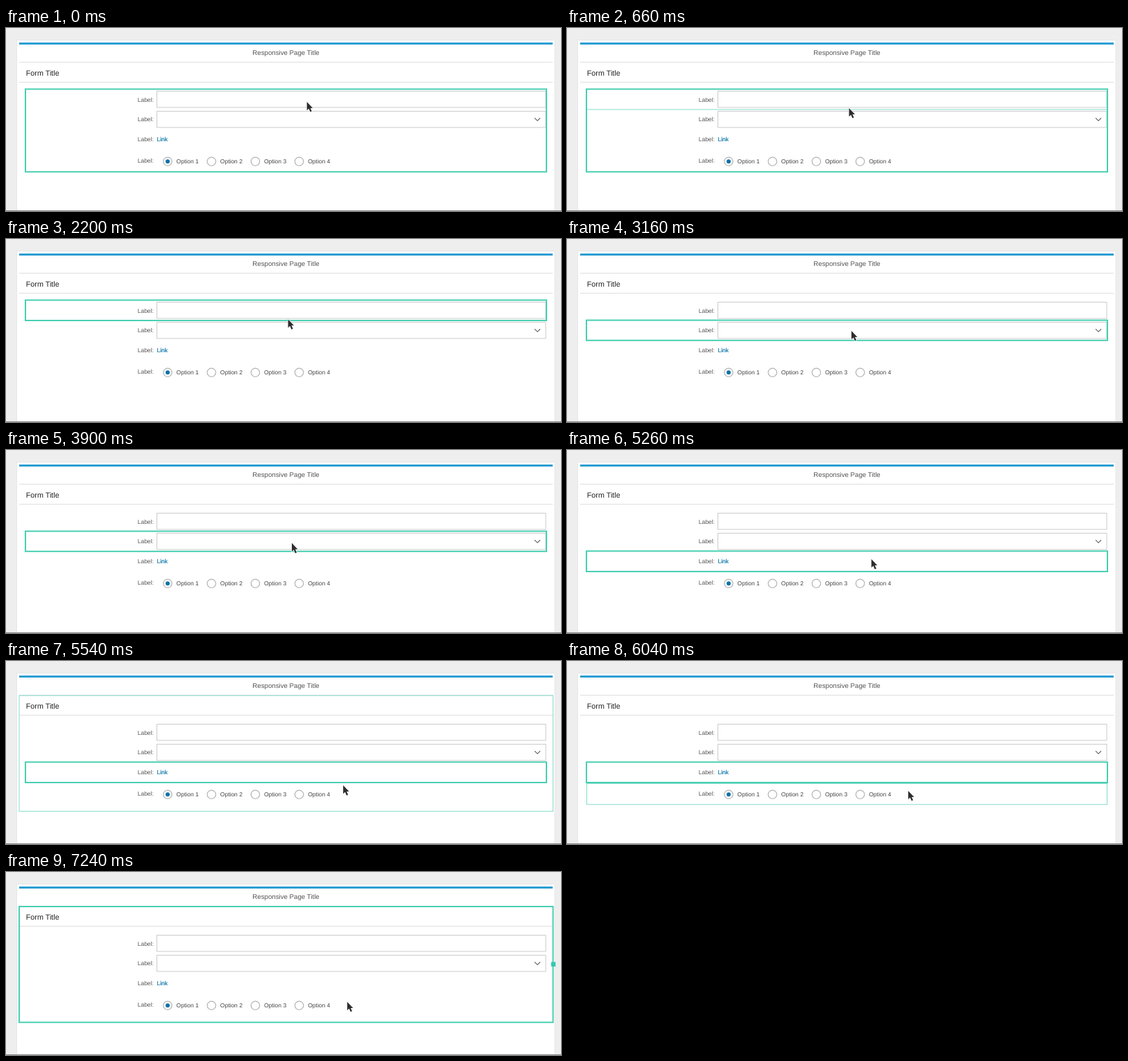
An HTML page that plays this animation: 800x265 px, repeating every 7.5 s.

```html
<!DOCTYPE html>
<html lang="en">
<head>
<meta charset="utf-8">
<title>Form selection</title>
<style>
  html, body { margin: 0; width: 100%; height: 100%; overflow: hidden; background: #eee; }
  svg { display: block; width: 800px; height: 265px; }
  text { font: 8.5px "Liberation Sans", Arial, sans-serif; fill: #555; text-rendering: geometricPrecision; }
  .title { font-size: 9.7px; text-anchor: middle; }
  .heading { font-size: 10.8px; fill: #222; }
  .link { fill: #0d76a8; stroke: #0d76a8; stroke-width: .2px; }
  .option { fill: #444; }
  .rule { fill: #dedede; }
  .field { fill: #fff; stroke: #cbcbcb; }
  .radio { fill: #fff; stroke: #b4b4b4; stroke-width: 1.2px; }
  #hover { fill: none; stroke: #82dcc9; stroke-width: 1px; }
  #selection { fill: none; stroke: #47cfb2; stroke-width: 2px; }
</style>
</head>
<body>
<svg viewBox="0 0 800 265">
  <rect width="800" height="265" fill="#eee"/>
  <rect x="15.5" y="17.5" width="775.5" height="250" fill="#fff" stroke="#e7e7e7"/>
  <rect x="19" y="21" width="769" height="3" fill="#2b9ed3"/>
  <rect class="rule" x="19" y="49" width="769" height="1"/>
  <rect class="rule" x="19" y="78" width="769" height="1"/>
  <text class="title" x="403.5" y="38.7">Responsive Page Title</text>
  <text class="heading" x="28.7" y="68.6">Form Title</text>
  <rect class="field" x="217.5" y="91.5" width="560.5" height="23.5"/>
  <rect class="field" x="217.5" y="120.5" width="560.5" height="23.5"/>
  <path d="M762 130.3l4 4 4-4" fill="none" stroke="#555" stroke-width="1.1"/>
  <text class="link" x="217.5" y="164">Link</text>
  <g id="controls"></g>
  <rect y="264" width="800" height="1" fill="#8c8c8c"/>
  <rect id="hover"/>
  <rect id="selection"/>
  <rect id="handle" x="785.8" y="130.3" width="6.4" height="6.6" fill="#36c9b0"/>
  <path id="cursor" d="M0 0V12.2L2.8 9.7 4.9 14.6 7.1 13.6 5 8.9H8.5Z"
        fill="#2e2e2e" stroke="#fff" stroke-width="1.4" paint-order="stroke" stroke-linejoin="round"/>
</svg>
<script>
const LOOP = 7500;
const byId = id => document.getElementById(id);

// Outlines as [left, top, right, bottom]
const row = (top, bottom) => [28, top, 779, bottom];
const group = row(88.5, 208.3);
const rows = [row(88.5, 118), row(117.6, 146.8), row(146.4, 176), row(177.5, 208)];
const linkHover = [28.5, 147.5, 778.5, 175.6];
const rowHover = [28.5, 177.5, 778.5, 207.8];
const form = [19, 50, 788.5, 217.7];

// Each state holds from its start time until the next one
const selections = [[0, group], [1400, rows[0]], [3160, rows[1]], [4640, rows[2]], [6140, form]];
const hovers = [
  [0, null], [440, rows[0]], [1400, null], [2260, rows[1]], [3160, null],
  [4120, linkHover], [4640, null], [5440, form], [5680, rowHover], [6140, null]
];

const easeInOut = p => p * p * (3 - 2 * p);
const easeOut = p => 1 - (1 - p) ** 2;
const moves = [
  { start: 420, end: 660, from: [433.7, 107], to: [406.5, 116], ease: easeInOut },
  { start: 2180, end: 2440, from: [406.5, 116], to: [410, 133], ease: easeInOut },
  { start: 3780, end: 4500, from: [410, 133], to: [436.5, 157], ease: easeInOut },
  { start: 5220, end: 5540, from: [436.5, 157], to: [486, 180], ease: easeInOut },
  { start: 5540, end: 5960, from: [486, 180], to: [491.8, 188], ease: easeOut }
];

byId('controls').innerHTML =
  [106.6, 135.4, 164, 195.2].map(y => `<text x="189.7" y="${y}">Label:</text>`).join('') +
  [0, 1, 2, 3].map(i => {
    const x = 233 + i * 63.2;
    return `<circle class="radio" cx="${x}" cy="193.3" r="6.2"/>
      <text class="option" x="${x + 12.6}" y="195.6">Option ${i + 1}</text>`;
  }).join('') +
  '<circle cx="233" cy="193.3" r="3" fill="#0b72a8"/>';

const stateAt = (states, t) => states.filter(([start]) => start <= t).pop()[1];

function cursorAt(t) {
  const { start, end, from, to, ease } = moves.filter(m => m.start <= t).pop() || moves[0];
  const p = ease(Math.min(1, Math.max(0, (t - start) / (end - start))));
  return from.map((v, i) => v + (to[i] - v) * p);
}

function showBox(id, box) {
  const el = byId(id);
  el.style.display = box ? '' : 'none';
  if (!box) return;
  const [left, top, right, bottom] = box;
  const attrs = { x: left, y: top, width: right - left, height: bottom - top };
  for (const name in attrs) el.setAttribute(name, attrs[name]);
}

function draw(t) {
  showBox('selection', stateAt(selections, t));
  showBox('hover', stateAt(hovers, t));
  byId('handle').style.display = t >= 6340 ? '' : 'none';
  byId('cursor').setAttribute('transform', `translate(${cursorAt(t)})`);
}

const began = performance.now();
function tick() {
  draw((performance.now() - began) % LOOP);
  requestAnimationFrame(tick);
}
tick();
</script>
</body>
</html>
```
